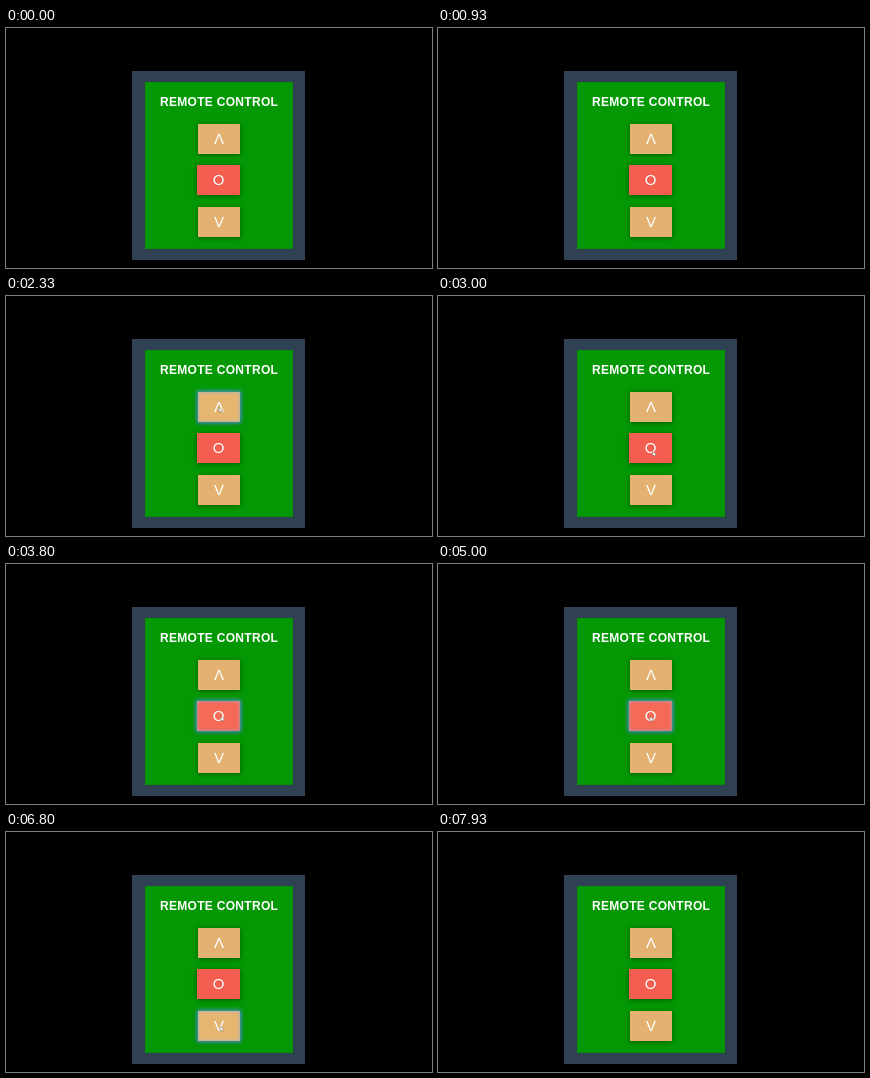
Write an HTML page that moves like this. It is 426x240 px and loops after 8.07 s.

```html
<!DOCTYPE html>
<html lang="en">
<head>
<meta charset="utf-8">
<title>Remote control</title>
<style>
  html, body { margin: 0; width: 100%; height: 100%; overflow: hidden; background: #000; }
  .stage { position: relative; width: 426px; height: 240px; overflow: hidden; font-family: "Liberation Sans", Arial, sans-serif; color: #fff; }
  .panel { position: absolute; box-sizing: border-box; left: 126px; top: 43px; width: 173px; height: 189px;
    background: #049804; border: solid #304153; border-width: 11px 12px 11px 13px; box-shadow: inset 0 0 1px rgba(0, 0, 0, .5); }
  .title { position: absolute; left: 154px; top: 68px; font-weight: bold; font-size: 12px; line-height: 13px; letter-spacing: .3px; white-space: nowrap; }
  .key { position: absolute; left: 192px; width: 42px; height: 30px; background: #e3b271; box-shadow: 0 1px 5px rgba(0, 0, 0, .42); }
  .power { left: 191px; width: 43px; background: #f45d50; }
  .key span { position: absolute; inset: 0; text-align: center; font-size: 15px; line-height: 30px; }
  .glow { position: absolute; inset: 0; opacity: 0; }
  .hover { background: rgba(215, 215, 205, .18); box-shadow: 0 0 5px 1px #d5dfda, inset 0 0 5px 1px rgba(215, 220, 215, .75); }
  .focus { background: rgba(245, 205, 120, .12); box-shadow: 0 0 4px 1px #509fe0, inset 0 0 3px #80b8e8; }
  .cursor { position: absolute; left: 0; top: 0; width: 5px; height: 6px; opacity: 0; }
</style>
</head>
<body>
<div class="stage">
  <div class="panel"></div>
  <div class="title">REMOTE CONTROL</div>
  <svg class="cursor" viewBox="0 0 5 6"><path d="M.5 .5V5L1.8 4L3 5.5L3.5 3.6H4.5Z" fill="#fff" stroke="#555" stroke-width=".4"/></svg>
</div>
<script>
  const LOOP = 8070;
  const FADE = 200;
  const stage = document.querySelector('.stage');
  const cursor = document.querySelector('.cursor');

  // Pointer arrival, press and departure for each key, in ms.
  const keys = [
    { label: 'Λ', enter: 930, press: 1470, leave: 2670 },
    { label: 'O', enter: 3000, press: 3530, leave: 5100, power: true },
    { label: 'V', enter: 5600, press: 6470, leave: 7400 }
  ];

  function play(element, steps) {
    const frames = steps.map(([time, style]) => ({ offset: time / LOOP, ...style }));
    element.animate(frames, { duration: LOOP, iterations: Infinity });
  }

  // Visible from one time to another, with a short fade after each.
  function show(element, from, to) {
    const steps = [[0, 0], [from, 0], [from + FADE, 1], [to, 1], [to + FADE, 0], [LOOP, 0]];
    play(element, steps.map(([time, opacity]) => [time, { opacity }]));
  }

  function add(parent, tag, className, text = '') {
    const element = document.createElement(tag);
    element.className = className;
    element.textContent = text;
    parent.append(element);
    return element;
  }

  const at = (x, y) => ({ transform: `translate(${x}px, ${y}px)` });

  // The pointer rises onto a key, then drifts left while it is pressed.
  const path = keys.flatMap(({ label, enter, press, leave, power }, index) => {
    const top = Math.round(95.5 + 41.7 * index);
    const key = add(stage, 'div', power ? 'key power' : 'key');
    key.style.top = top + 'px';
    show(add(key, 'div', 'glow hover'), enter, press);
    show(add(key, 'div', 'glow focus'), press, leave);
    add(key, 'span', '', label);
    return [[enter, at(214, top + 18)], [press, at(215, top + 15)], [leave, at(211, top + 15)]];
  });

  stage.append(cursor);
  play(cursor, [[0, path[0][1]], ...path, [LOOP, path.at(-1)[1]]]);
  show(cursor, keys[0].enter, keys[2].leave);
</script>
</body>
</html>
```
